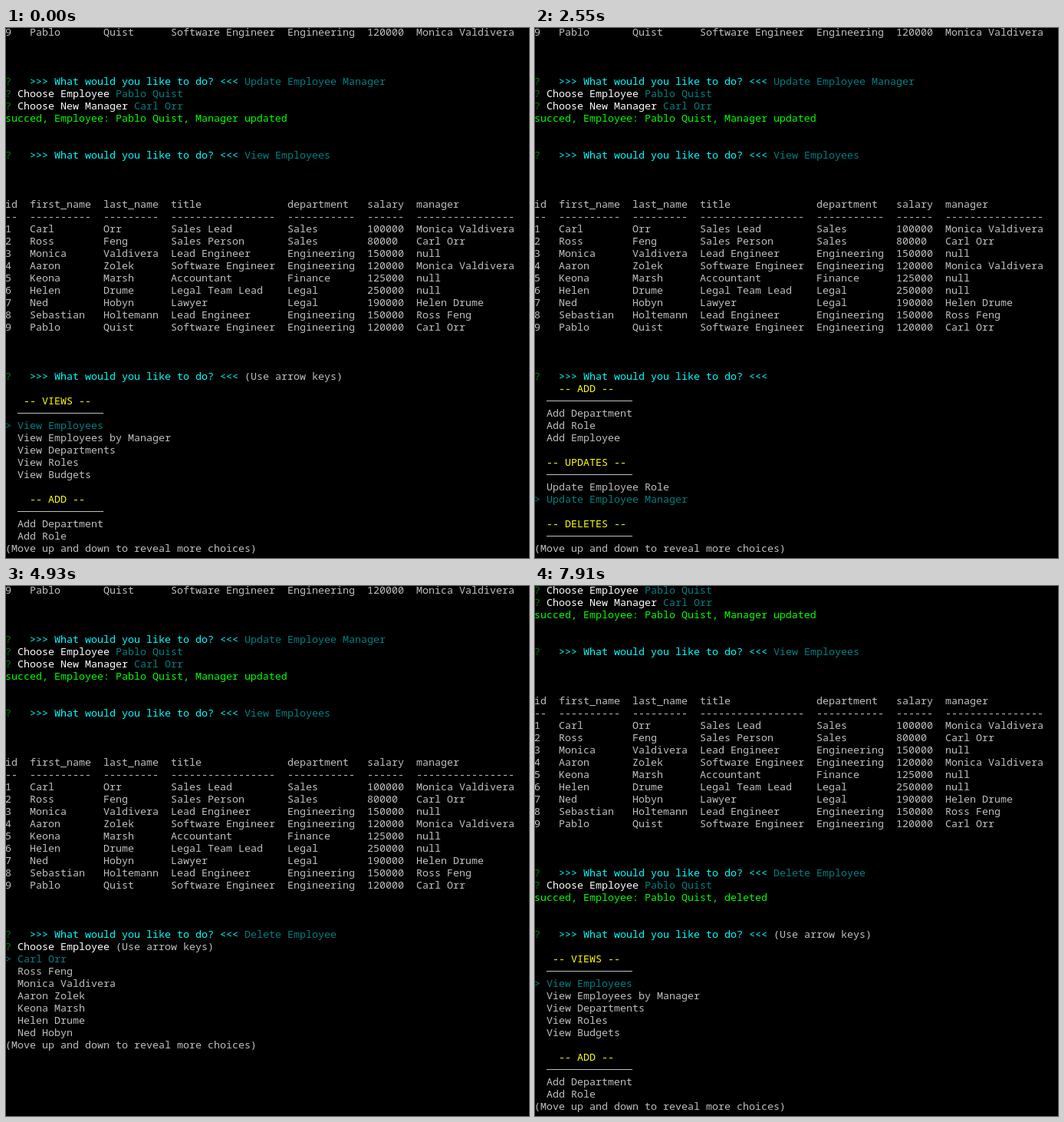
An HTML page that plays this animation: 682x690 px, repeating every 8000 ms.

```html
<!DOCTYPE html>
<html lang="en">
<head>
<meta charset="utf-8">
<title>Employee tracker</title>
<style>
  html, body { margin: 0; width: 100%; height: 100%; overflow: hidden; background: #000; }
  svg { display: block; width: 682px; height: 690px; }
  text { font: 13.333px "Noto Sans Mono", "DejaVu Sans Mono", monospace; white-space: pre; }
</style>
</head>
<body>
<svg id="term" viewBox="0 0 682 690"></svg>
<script>
const LOOP = 8000, CELL = 8, ROW = 16;
const C = {
  text: '#c0c0c0', yellow: '#ffff00', bright: '#ffffff', ask: '#00ffff',
  pick: '#008080', mark: '#008000', ok: '#00ff00'
};

const people = [
  ['Carl', 'Orr', 'Sales Lead', 'Sales', 100000, 3],
  ['Ross', 'Feng', 'Sales Person', 'Sales', 80000, 1],
  ['Monica', 'Valdivera', 'Lead Engineer', 'Engineering', 150000, 0],
  ['Aaron', 'Zolek', 'Software Engineer', 'Engineering', 120000, 3],
  ['Keona', 'Marsh', 'Accountant', 'Finance', 125000, 0],
  ['Helen', 'Drume', 'Legal Team Lead', 'Legal', 250000, 0],
  ['Ned', 'Hobyn', 'Lawyer', 'Legal', 190000, 6],
  ['Sebastian', 'Holtemann', 'Lead Engineer', 'Engineering', 150000, 2],
  ['Pablo', 'Quist', 'Software Engineer', 'Engineering', 120000, 1]
];
const names = people.map(p => p[0] + ' ' + p[1]);
const last = names[8];

// A row is a list of [column, text, colour]; 'rule' stands for a separator.
const heads = ['id', 'first_name', 'last_name', 'title', 'department', 'salary', 'manager'];
const cols = [0, 4, 16, 27, 46, 59, 67];
const dashes = [2, 10, 9, 17, 11, 6, 16].map(n => '-'.repeat(n));
const tableRow = cells => cells.map((s, i) => [cols[i], String(s), C.text]);
const person = (i, boss = people[i][5]) =>
  tableRow([i + 1, ...people[i].slice(0, 5), boss ? names[boss - 1] : 'null']);

const ask = (tail = '', color = C.pick) => [
  [0, '?', C.mark], [4, '>>> What would you like to do? <<<', C.ask], [39, tail, color]
];
const choose = (label, tail = '', color = C.pick) => [
  [0, '?', C.mark], [2, label, C.bright], [label.length + 3, tail, color]
];
const success = s => [[0, 'succed, Employee: ' + last + ', ' + s, C.ok]];
const hint = '(Use arrow keys)';
const more = [[0, '(Move up and down to reveal more choices)', C.text]];
const option = (s, on) => on ? [[0, '> ' + s, C.pick]] : [[2, s, C.text]];

const history = [
  person(8, 3), [], [], [],
  ask('Update Employee Manager'),
  choose('Choose Employee', last),
  choose('Choose New Manager', names[0]),
  success('Manager updated'), [], [],
  ask('View Employees'), [], [], [],
  tableRow(heads), tableRow(dashes),
  ...people.map((p, i) => person(i)), [], [], []
];

const menu = [];
const targets = [];
for (const [col, title, items] of [
  [3, 'VIEWS', ['View Employees', 'View Employees by Manager', 'View Departments', 'View Roles', 'View Budgets']],
  [4, 'ADD', ['Add Department', 'Add Role', 'Add Employee']],
  [2, 'UPDATES', ['Update Employee Role', 'Update Employee Manager']],
  [2, 'DELETES', ['Delete Employee', 'Delete Department', 'Delete Role']]
]) {
  menu.push([], [[col, `-- ${title} --`, C.yellow]], 'rule');
  const group = menu.filter(m => m === 'rule').length;
  for (const item of items) {
    targets.push({ line: menu.length, top: Math.max(0, menu.length - group - 6) });
    menu.push(item);
  }
}

function menuPage(n) {
  const { line, top } = targets[n];
  return menu.slice(top, top + 13).map((m, i) =>
    typeof m === 'string' && m !== 'rule' ? option(m, top + i === line) : m).concat([more]);
}

function employeePage(first) {
  return Array.from({ length: 7 }, (_, i) => option(names[(first + i) % 9], i === 0)).concat([more]);
}

const mainMenu = n => [ask(n ? '' : hint, C.text), ...menuPage(n)];
const deleting = ask('Delete Employee');
const done = [deleting, choose('Choose Employee', last), success('deleted'), [], []];

const steps = [[0, () => [...history, ...mainMenu(0)]]];
for (let n = 1; n <= 10; n++)
  steps.push([500 + (n - 1) * 250, () => [...history, ...mainMenu(n)]]);
steps.push(
  [4590, () => [...history, deleting]],
  [4630, () => [...history, deleting, choose('Choose Employee', hint, C.text), ...employeePage(0)]],
  [5950, () => [...history, deleting, choose('Choose Employee'), ...employeePage(8)]],
  [7270, () => [...history, deleting]],
  [7310, () => [...history, ...done, ...mainMenu(0)].slice(done.length)]
);

const svg = document.getElementById('term');
function add(tag, attrs, content = '') {
  const el = document.createElementNS('http://www.w3.org/2000/svg', tag);
  for (const k in attrs) el.setAttribute(k, attrs[k]);
  el.textContent = content;
  svg.appendChild(el);
}

function draw(rows) {
  svg.replaceChildren();
  rows.forEach((row, r) => {
    if (row === 'rule') {
      add('rect', { x: 15, y: r * ROW + 5, width: 14 * CELL, height: 1, fill: C.text });
      return;
    }
    for (const [col, s, fill] of row)
      if (s) add('text', { x: col * CELL - 1, y: r * ROW + 10, fill }, s);
  });
}

let shown = -1;
const start = performance.now();
function tick() {
  const t = (performance.now() - start) % LOOP;
  let i = steps.length - 1;
  while (steps[i][0] > t) i--;
  if (i !== shown) draw(steps[shown = i][1]());
  requestAnimationFrame(tick);
}
tick();
</script>
</body>
</html>
```
